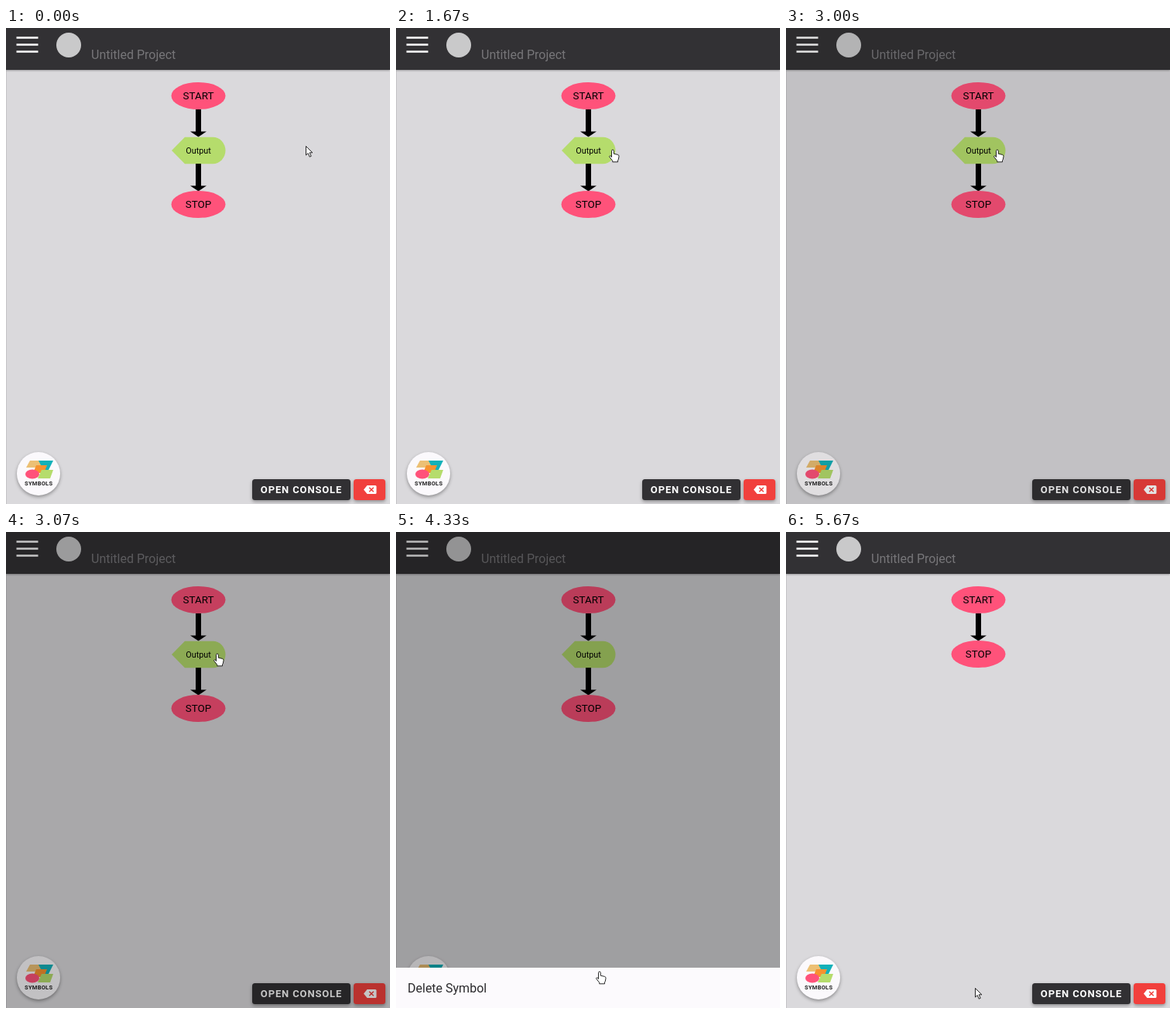
An HTML page for the animation above (6470 ms loop, 496x614 px).

```html
<!DOCTYPE html>
<html lang="en">
<head>
<meta charset="utf-8">
<title>Flowchart editor: delete symbol</title>
<style>
  html, body { margin: 0; width: 100%; height: 100%; overflow: hidden; background: #dad9dc; }
  svg { display: block; font-family: Roboto, sans-serif; }
  .mid { text-anchor: middle; }
  .label { font-size: 13.4px; }
  .bold { font-weight: 700; }
  .raised { filter: drop-shadow(0 2px 2px rgba(0, 0, 0, .35)); }
</style>
</head>
<body>
<svg width="496" height="614" viewBox="0 0 496 614">
  <defs>
    <path id="arrow" d="M245 105h7v28.500h7l-10.500 7-10.500-7h7z"/>
  </defs>

  <rect width="496" height="614" fill="#dad9dc"/>
  <rect y="54" width="1" height="560" fill="#c6c5c8"/>

  <g id="header">
    <rect width="496" height="54" fill="#323134" style="filter:drop-shadow(0 1px 1px rgba(0,0,0,.3))"/>
    <path d="M13.500 12.500h28M13.500 21.500h28M13.500 30.500h28" stroke="#fff" stroke-width="2.400"/>
    <circle cx="81" cy="22" r="16" fill="#c9c9ca"/>
    <text x="110" y="40" font-size="16" fill="#777679">Untitled Project</text>
  </g>

  <g id="chart">
    <ellipse cx="248.500" cy="87.500" rx="35" ry="17.500" fill="#ff527a"/>
    <text class="mid label" x="248.500" y="92.300">START</text>
    <use href="#arrow"/>
    <g id="output">
      <path d="M214 158l17-17.300h36a16.500 17.300 0 0 1 0 34.600h-36z" fill="#b5dc6c"/>
      <text class="mid" x="248.500" y="162" font-size="10.800">Output</text>
      <use href="#arrow" y="70"/>
    </g>
    <g id="stop">
      <ellipse cx="248.500" cy="157.500" rx="35" ry="17.500" fill="#ff527a"/>
      <text class="mid label" x="248.500" y="162.300">STOP</text>
    </g>
  </g>

  <g id="symbols">
    <circle class="raised" cx="42" cy="575" r="28" fill="#fbf9fc"/>
    <path d="M31 558h15l4 9H26z" fill="#ecc074"/>
    <path d="M42 558h19l-6 12h-7z" fill="#12b1b9"/>
    <path d="M39 564h14l-4 10H35z" fill="#f7922f"/>
    <path d="M46 570h15l-4 11H41z" fill="#b5dc6c"/>
    <ellipse cx="34" cy="575.500" rx="9" ry="6" fill="#ff527a"/>
    <text class="mid bold" x="42.200" y="589.500" font-size="7.500" letter-spacing=".25" fill="#222">SYMBOLS</text>
  </g>

  <g id="buttons">
    <rect class="raised" x="318" y="582" width="127" height="27" rx="3.500" fill="#313033"/>
    <text class="mid bold" x="381.500" y="599.700" font-size="13" letter-spacing=".85" fill="#fff">OPEN CONSOLE</text>
    <rect class="raised" x="449" y="582" width="41" height="27" rx="3.500" fill="#f1403d"/>
    <path d="M462 595.500l4.500-5.500h10.500q1.500 0 1.500 1.500v8q0 1.500-1.500 1.500h-10.500z" fill="#fff"/>
    <path d="M469.200 592.700l5.600 5.600m0-5.600l-5.600 5.600" stroke="#f1403d" stroke-width="1.500"/>
  </g>

  <rect id="backdrop" width="496" height="614"/>
  <g id="sheet">
    <rect y="562" width="496" height="614" fill="#fcfafd"/>
    <text x="15" y="594" font-size="16" fill="#2b2a2d">Delete Symbol</text>
  </g>

  <g id="cursor" fill="#fff" stroke="#111" stroke-width=".9" stroke-linejoin="round">
    <path id="pointer" d="M.5.5V12l2.700-2.500 2 4.700 2-.9-2-4.500h3.700z"/>
    <path id="hand" d="M-1.500 9.500V1.500a1.400 1.400 0 0 1 2.800 0V5.200l5.200 1.200q1.700.4 1.500 2.300l-.6 3.300q-.2 1.200-.9 1.800v2H-.3v-1.600L-4 9.600q-.8-1.300.4-1.800 1.200-.3 2.100 1.700z"/>
  </g>
</svg>
<script>
const LOOP = 6470, OPEN = 2935, CLOSE = 4941, ENTER = 400, LEAVE = 450;
const DIM = 0.27, TRAVEL = 614;
const $ = id => document.getElementById(id);
const clamp = v => Math.min(1, Math.max(0, v));

// Cursor stops: time, x, y
const path = [
  [0, 387, 152], [870, 387, 152], [1130, 362, 153], [1470, 299, 155], [1670, 280, 157],
  [2130, 275, 157], [2330, 273, 157], [3500, 273, 157], [3680, 285, 225],
  [3900, 300, 420], [4130, 283, 545], [4530, 244, 588], [LOOP, 244, 588]
];

function cursorAt(t) {
  const i = path.findIndex(p => p[0] > t);
  const [a, b] = [path[i - 1], path[i]];
  const k = (t - a[0]) / (b[0] - a[0]);
  return [1, 2].map(n => Math.round(a[n] + (b[n] - a[n]) * k));
}

// cubic-bezier(.36, .66, .04, 1)
function ease(x) {
  const curve = (s, p, q) => 3 * p * s * (1 - s) ** 2 + 3 * q * s * s * (1 - s) + s ** 3;
  let lo = 0, hi = 1;
  for (let i = 0; i < 24; i++) {
    const mid = (lo + hi) / 2;
    if (curve(mid, 0.36, 0.04) < x) lo = mid; else hi = mid;
  }
  return curve(lo, 0.66, 1);
}

const show = (id, on) => $(id).setAttribute('visibility', on ? 'visible' : 'hidden');
const move = (id, x, y) => $(id).setAttribute('transform', `translate(${x} ${y})`);

function draw(t) {
  const shown = ease(clamp((t - OPEN) / ENTER)) - ease(clamp((t - CLOSE) / LEAVE));
  const deleted = t >= CLOSE;
  const [x, y] = cursorAt(t);
  const modal = t >= OPEN && t < CLOSE + LEAVE;
  const hand = modal || (!deleted && x < 284);

  $('backdrop').setAttribute('opacity', DIM * shown);
  move('sheet', 0, TRAVEL * (1 - shown));
  show('output', !deleted);
  move('stop', 0, deleted ? 0 : 70);
  move('cursor', x, y);
  show('hand', hand);
  show('pointer', !hand);
}

function tick() {
  draw(performance.now() % LOOP);
  requestAnimationFrame(tick);
}
tick();
</script>
</body>
</html>
```
